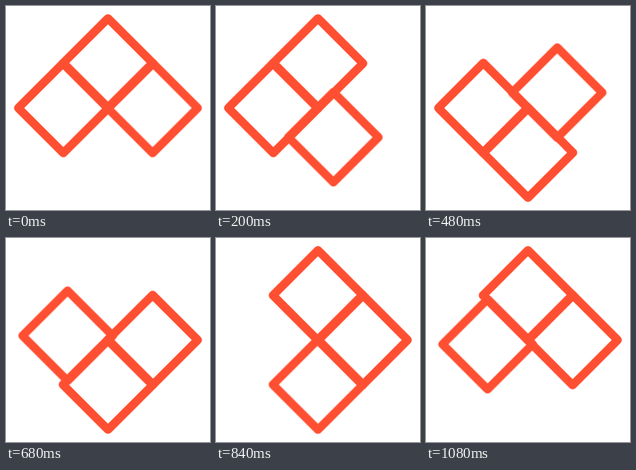
Recreate the animation shown at these times as an HTML page without scripts. Size 256 by 256 pixels, loop 1.12 s.

```html
<!DOCTYPE html>
<html lang="en">
<head>
<meta charset="utf-8">
<title>Sliding squares</title>
<style>
  html, body {
    margin: 0;
    width: 100%;
    height: 100%;
    overflow: hidden;
    background: #fff;
  }
  svg {
    display: block;
    width: 100%;
    height: 100%;
  }
  rect {
    fill: none;
    stroke: #ff4f32;
    stroke-width: 10.6;
    stroke-linejoin: round;
  }

  /* Each slide leaves the layout a quarter turn on, so one move serves all four. */
  .board {
    transform-origin: 128px 128px;
    animation: turn 1120ms steps(4, end) infinite;
  }
  .slider {
    animation: slide 280ms step-end infinite;
  }
  @keyframes turn {
    from { transform: rotate(0deg); }
    to { transform: rotate(-360deg); }
  }
  /* Sine ease-in-out over 56px, held for 40ms per step. */
  @keyframes slide {
    0% { transform: translate(0, 0); }
    42.85% { transform: translate(-5.35px, 5.35px); }
    57.14% { transform: translate(-19.35px, 19.35px); }
    71.42% { transform: translate(-36.65px, 36.65px); }
    85.71% { transform: translate(-50.65px, 50.65px); }
    100% { transform: translate(-56px, 56px); }
  }
</style>
</head>
<body>
<svg viewBox="0 0 256 256">
  <defs>
    <rect id="tile" x="-40" y="-40" width="80" height="80" transform="rotate(45)"/>
  </defs>
  <g class="board">
    <use href="#tile" x="128" y="72"/>
    <use href="#tile" x="72" y="128"/>
    <g class="slider">
      <use href="#tile" x="184" y="128"/>
    </g>
  </g>
</svg>
</body>
</html>
```
